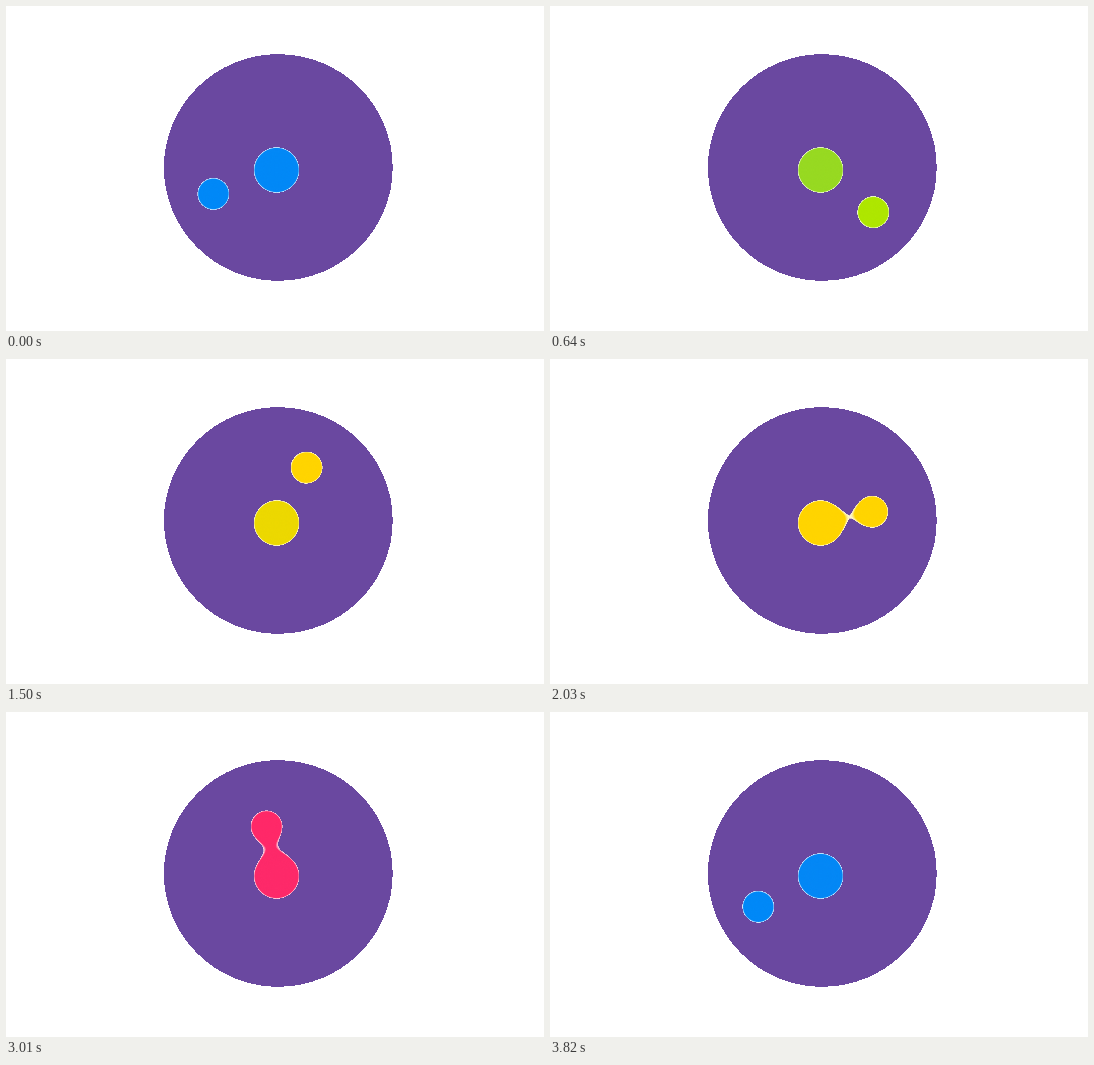
These frames come from a looping animation (538 px wide and 325 px high, 3880 ms). An HTML page:

```html
<!DOCTYPE html>
<html lang="en">
<head>
<meta charset="utf-8">
<title>Gooey orbit</title>
<style>
  html, body { margin: 0; width: 100%; height: 100%; overflow: hidden; background: #fff; }
  svg { display: block; }
</style>
</head>
<body>
<svg width="538" height="325" viewBox="0 0 538 325">
  <filter id="goo" filterUnits="userSpaceOnUse" x="0" y="0" width="538" height="325" color-interpolation-filters="sRGB">
    <feGaussianBlur stdDeviation="10" result="blur"/>
    <feColorMatrix in="blur" values="0 0 0 0 1  0 0 0 0 1  0 0 0 0 1  0 0 0 200 -100.5" result="rim"/>
    <feColorMatrix in="blur" values="1 0 0 0 0  0 1 0 0 0  0 0 1 0 0  0 0 0 20 -10" result="body"/>
    <feMerge><feMergeNode in="rim"/><feMergeNode in="body"/></feMerge>
  </filter>
  <ellipse cx="272.3" cy="161.5" rx="114.4" ry="113.3" fill="#6a48a0" shape-rendering="crispEdges"/>
  <g id="drops" filter="url(#goo)"></g>
</svg>
<script>
const LOOP = 3880, QUARTER = LOOP / 4, REACH = 69.5;
const CENTER = { x: 270.6, y: 164 };
const COLORS = [[0, 136, 247], [174, 230, 0], [255, 212, 0], [255, 40, 104]];
const group = document.getElementById('drops');

const rgb = c => `rgb(${c.map(Math.round)})`;
const wrap = t => ((t % LOOP) + LOOP) % LOOP;

function addCircle(r, color) {
  const circle = document.createElementNS('http://www.w3.org/2000/svg', 'circle');
  circle.setAttribute('r', r);
  circle.setAttribute('fill', rgb(color));
  return group.appendChild(circle);
}

function place(circle, x, y) {
  circle.setAttribute('cx', x);
  circle.setAttribute('cy', y);
}

// The CSS "ease" curve, cubic-bezier(.25, .1, .25, 1)
function ease(x) {
  if (x <= 0) return 0;
  if (x >= 1) return 1;
  let lo = 0, hi = 1;
  for (let i = 0; i < 24; i++) {
    const s = (lo + hi) / 2;
    if (0.75 * s * (1 - s) + s ** 3 < x) lo = s; else hi = s;
  }
  return 0.3 * lo * (1 - lo) ** 2 + 3 * lo * lo * (1 - lo) + lo ** 3;
}

const balls = COLORS.map(color => addCircle(19, color));
const core = addCircle(25, COLORS[0]);
place(core, CENTER.x, CENTER.y);

function draw(t) {
  const angle = (159.2 / 360 + t / LOOP) * 2 * Math.PI;
  balls.forEach((ball, k) => {
    const u = wrap(t - 70 - QUARTER * (k - 1));
    const out = ease(u / 727) - ease((u - 870) / 690);
    const r = REACH * out * (k % 2 ? -1 : 1);
    place(ball, CENTER.x + r * Math.cos(angle), CENTER.y + r * Math.sin(angle));
  });

  const v = wrap(t - 85) / QUARTER;
  const k = Math.floor(v), mix = ease(v - k);
  const next = COLORS[(k + 1) % 4];
  core.setAttribute('fill', rgb(COLORS[k].map((c, i) => c + (next[i] - c) * mix)));
}

const start = performance.now();
function tick() {
  draw((performance.now() - start) % LOOP);
  requestAnimationFrame(tick);
}
tick();
</script>
</body>
</html>
```
